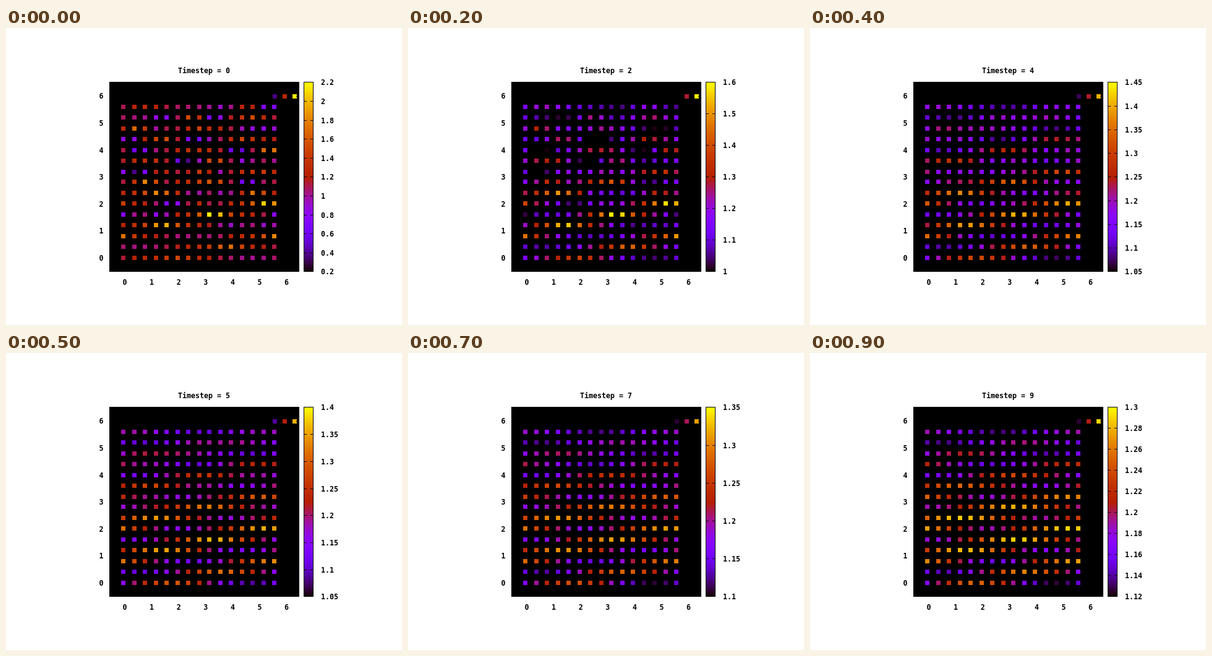
Recreate the animation shown at these times as an HTML page with a canvas. Size 640 by 480 pixels, loop 1000 ms.

```html
<!DOCTYPE html>
<html lang="en">
<head>
<meta charset="utf-8">
<title>Timestep</title>
<style>
html, body { margin: 0; width: 640px; height: 480px; overflow: hidden; background: #fff; }
canvas { display: block; }
</style>
</head>
<body>
<canvas id="c" width="640" height="480"></canvas>
<script>
const ctx = document.getElementById('c').getContext('2d');
const N = 15, STEPS = 10, TOP = 87, BOTTOM = 393, TAU = 2 * Math.PI;
const index = [...Array(N).keys()];

// Hot and cold blobs at the start: row, column ahead of the crest, height.
const blobs = [
  [1.5, .8, .4], [4, 0, .75], [6, .3, .3], [6.6, -5.8, .75],
  [10, 5.4, .7], [12.3, 3, .5], [12.3, -2.3, .55],
  [7.4, 3.4, -.75], [9.2, 2.4, -.75], [11, 2.3, -.45], [10.3, 8.1, -.55],
  [4.5, 6.2, -.5], [4, 10, -.4], [8, 10.9, -.3], [12.8, 10, -.35], [13.4, -.7, -.75]
];

// Signed distance around the ring of columns.
const ring = d => d - N * Math.round(d / N);

// A slow wave whose crest moves on from row to row, plus blobs that spread and fade.
function heat(r, c, t) {
  const ahead = c - (4.4 + 4.62 * r + .026 * r * r), left = STEPS - 1 - t;
  const mean = 1.2 + .038 * Math.cos(TAU * (r - 5.4) / 18) / .95 ** left;
  const amp = (.062 - .0024 * r) / .89 ** left;
  let v = mean + amp * Math.cos(TAU * ahead / N);
  for (const [row, col, height] of blobs) {
    const across = ring(ahead - col) ** 2 / (.7 + .25 * t);
    const along = (r - row) ** 2 / (1.2 + .25 * t);
    v += height * .52 ** t * Math.exp(-(across + along) / 2);
  }
  return v;
}

// Round the colour range outwards to whole ticks.
function scale(min, max) {
  const span = max - min;
  const gap = span > 1.5 ? .2 : span > .5 ? .1 : span > .2 ? .05 : .02;
  return [Math.floor(min / gap) * gap, Math.ceil(max / gap) * gap, gap];
}

// The hottest and coldest values close in on the settled range.
const extremes = t => [1.11 - .78 * .47 ** t - .008 * (9 - t) * (t > 3),
                       1.265 + .6 * .5 ** t + .33 * .78 ** t];

function shade(x) {
  x = Math.min(1, Math.max(0, x));
  const rgb = [Math.sqrt(x), x ** 3, Math.max(0, Math.sin(TAU * x))];
  return `rgb(${rgb.map(v => Math.round(255 * v))})`;
}

function box(x, y, w, h, fill = '#000') {
  ctx.fillStyle = fill;
  ctx.fillRect(x, y, w, h);
}

function text(s, x, y) {
  ctx.fillStyle = '#000';
  ctx.fillText(s, x, y);
}

const offset = i => Math.round(17.4286 * i + .57 * (i % 2));

function draw(t) {
  const lows = [.2, .8, 1, 1, 1.05, 1.05, 1.05, 1.1, 1.1, 1.12];
  const highs = [2.2, 1.8, 1.6, 1.5, 1.45, 1.4, 1.4, 1.35, 1.32, 1.3];
  const low = lows[t], high = highs[t], gap = scale(low + .02, high - .01)[2];
  const dot = (x, y, v) => box(x, y, 7, 7, shade((v - low) / (high - low)));

  box(0, 0, 640, 480, '#fff');
  ctx.font = 'bold 11.63px "DejaVu Sans Mono", "Liberation Mono", monospace';
  text('Timestep = ' + t, 278, 73);

  box(167, TOP, 307, 307);
  for (let i = 0; i < 7; i++) {
    text(i, 188.5 + 43.6 * i, 415);
    text(i, 150.5, 376 - 43.6 * i);
  }
  const field = index.map(r => index.map(c => heat(r, c, t)));
  field.forEach((row, r) =>
    row.forEach((v, c) => dot(186 + offset(c), 368 - offset(r), v)));

  const all = field.flat(), min = Math.min(...all), max = Math.max(...all);
  [min, (min + max) / 2, max].forEach((v, i) => dot(431 + 16 * i, 107, v));
  box(469, 110, 5, 1);

  box(481, TOP, 16, 307);
  for (let y = TOP + 1; y < BOTTOM; y++)
    box(482, y, 14, 1, shade((BOTTOM - y) / (BOTTOM - TOP)));
  const ticks = Math.round((high - low) / gap);
  for (let i = 0; i <= ticks; i++) {
    const y = Math.ceil(BOTTOM - (BOTTOM - TOP) * i / ticks);
    box(482, y, 4, 1);
    box(492, y, 4, 1);
    text(+(low + gap * i).toFixed(2), 509, y + 5);
  }
}

function tick() {
  draw(Math.floor(performance.now() / 100) % STEPS);
  requestAnimationFrame(tick);
}
tick();
</script>
</body>
</html>
```
